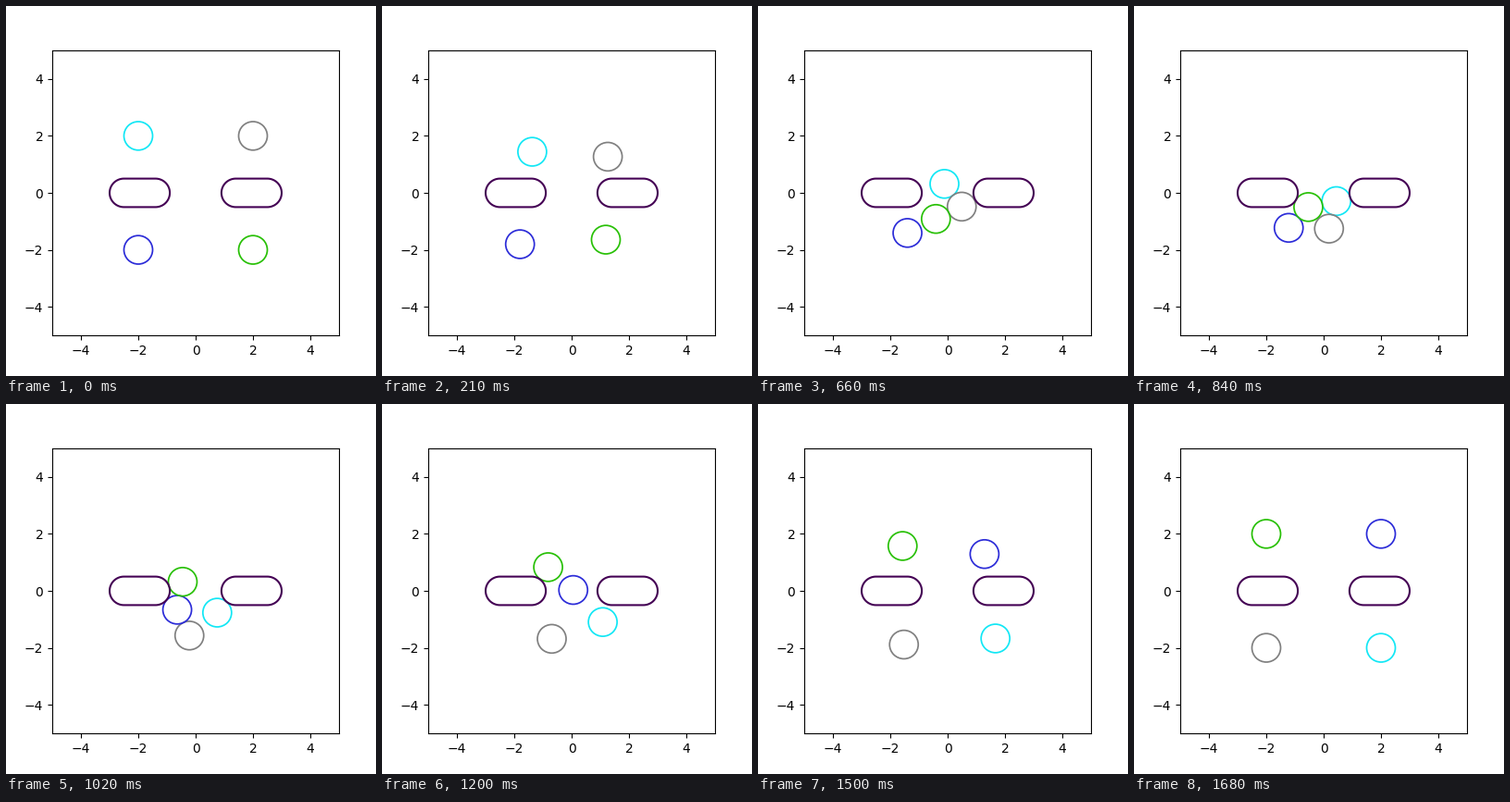
Animation of 400 by 400 pixels, one loop 1710 ms. Source, as a matplotlib script:

```python
from itertools import combinations

import numpy as np
import matplotlib.pyplot as plt
from matplotlib.animation import FuncAnimation

STEPS = 38            # path steps from start to goal
TICKS = 57            # every third tick repeats the pose before it
RADIUS = 0.5
COLORS = ["#12e7f5", "#808080", "#2c2cd8", "#28c006"]
BARS = [(-2.5, -1.4), (1.4, 2.5)]   # x extent of each bar's core

# Each disc crosses to the opposite corner; MIDDLE is the tight squeeze.
START = np.array([(-2, 2), (2, 2), (-2, -2), (2, -2)], float)
MIDDLE = np.array([(0.45, -0.29), (0.19, -1.25), (-1.22, -1.23), (-0.53, -0.5)])
GOAL = -START


def contacts(path):
    """Yield (gap, normal, first disc, second disc or None, step) per overlap."""
    for k in range(1, STEPS):
        pose = path[k]
        pairs = [(i, j, pose[j]) for i, j in combinations(range(4), 2)]
        for i in range(4):
            for lo, hi in BARS:
                core = np.array([min(max(pose[i, 0], lo), hi), 0.0])
                pairs.append((i, None, core))
        for i, j, other in pairs:
            diff = pose[i] - other
            dist = np.hypot(*diff)
            if dist < 2 * RADIUS:
                yield 2 * RADIUS - dist, diff / dist, i, j, k


def plan_paths(rounds=220, stiff=400.0, damping=0.6):
    """Least-effort paths that keep discs and bars apart."""
    half = STEPS // 2
    t = np.linspace(0, 1, half + 1)[:, None, None]
    path = np.concatenate(
        [START + t * (MIDDLE - START), MIDDLE + t[1:] * (GOAL - MIDDLE)]
    ).ravel()

    diff = np.diff(np.eye(STEPS + 1), axis=0)
    base = np.kron(diff.T @ diff, np.eye(8))
    pull = np.zeros(path.size)
    for k, pose, weight in [(0, START, 1e5), (half, MIDDLE, 1), (STEPS, GOAL, 1e5)]:
        idx = np.arange(8 * k, 8 * k + 8)
        base[idx, idx] += weight
        pull[idx] += weight * pose.ravel()

    for _ in range(rounds):
        lhs, rhs = base.copy(), pull.copy()
        for gap, normal, i, j, k in contacts(path.reshape(-1, 4, 2)):
            idx = [8 * k + 2 * i, 8 * k + 2 * i + 1]
            grad = normal
            if j is not None:
                idx += [8 * k + 2 * j, 8 * k + 2 * j + 1]
                grad = np.concatenate([normal, -normal])
            lhs[np.ix_(idx, idx)] += stiff * np.outer(grad, grad)
            rhs[idx] += stiff * grad * (gap + grad @ path[idx])
        path = path + damping * (np.linalg.solve(lhs, rhs) - path)
    return path.reshape(-1, 4, 2)


def draw_bar(ax, lo, hi):
    a = np.linspace(-np.pi / 2, np.pi / 2, 40)
    cap = RADIUS * np.column_stack([np.cos(a), np.sin(a)])
    outline = np.concatenate([cap + (hi, 0), (lo, 0) - cap])
    ax.add_patch(plt.Polygon(outline, fill=False, ec="#440154", lw=1.5, zorder=2))


paths = plan_paths()

fig, ax = plt.subplots(figsize=(4, 4), dpi=100)
ax.set_xlim(-5, 5)
ax.set_ylim(-5, 5)
for lo, hi in BARS:
    draw_bar(ax, lo, hi)
discs = [
    ax.add_patch(plt.Circle(pos, RADIUS, fill=False, ec=color, lw=1.25))
    for pos, color in zip(START, COLORS)
]


def update(tick):
    step = -(-2 * tick // 3)
    for disc, pos in zip(discs, paths[step]):
        disc.center = tuple(pos)
    return discs


anim = FuncAnimation(fig, update, frames=TICKS, interval=30, repeat=True, repeat_delay=0)
plt.show()
```
